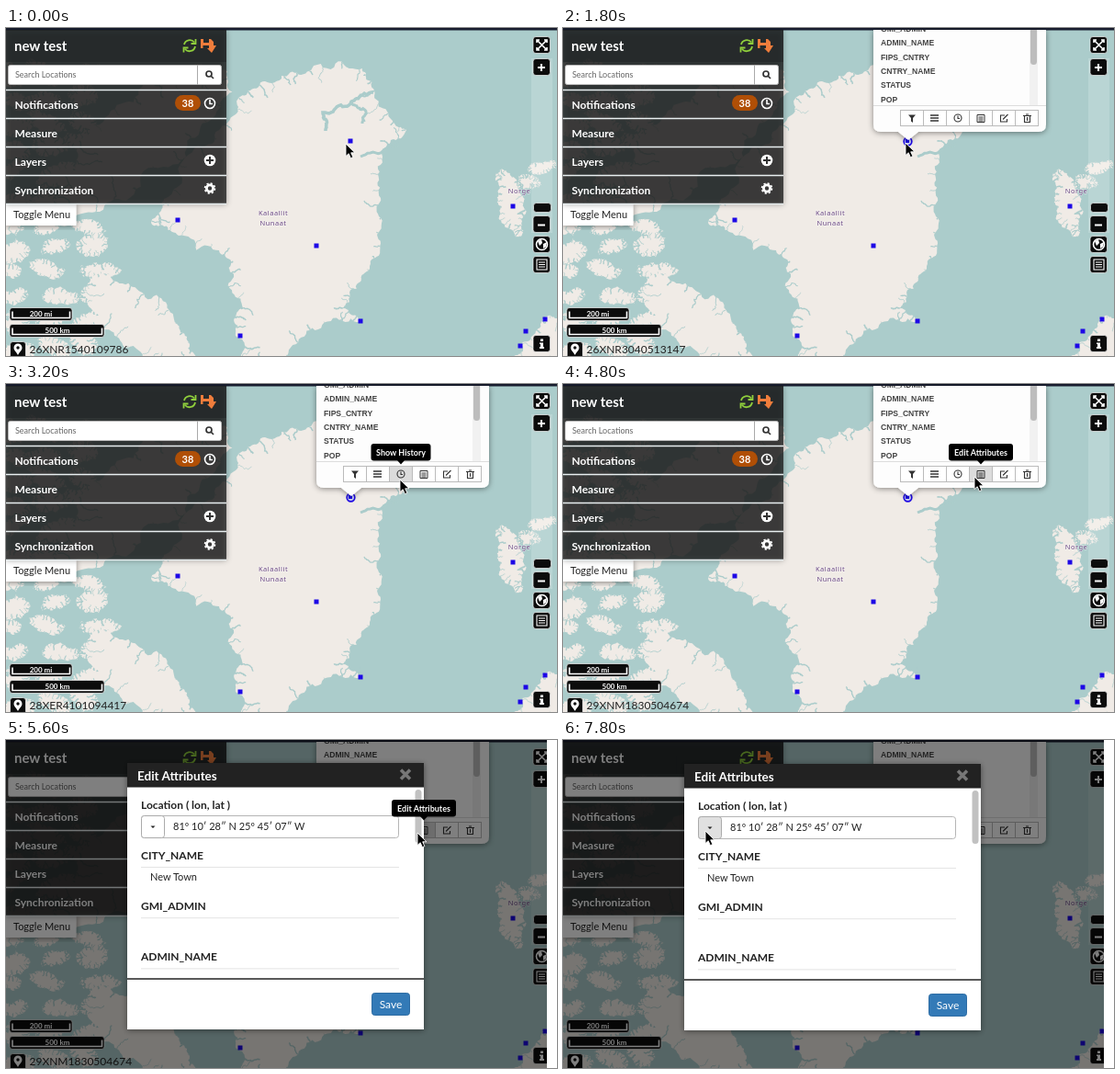
These frames come from a looping animation (600 px wide and 357 px high, 8 s). An HTML page:

```html
<!DOCTYPE html>
<html lang="en">
<head>
<meta charset="utf-8">
<title>Map editor</title>
<style>
html, body { margin: 0; height: 100%; overflow: hidden; }
svg { display: block; }
text { font: 12px Lato, sans-serif; fill: #222; }
.b { font-weight: bold; }
.w, text.w { fill: #fff; }
.mid { text-anchor: middle; }
.s8 { font-size: 8px; }
.s9 { font-size: 9px; }
.s11 { font-size: 11px; }
.s15 { font-size: 15px; }
.ctl { fill: #0c0c0c; stroke: #fff; stroke-opacity: .65; }
.line { fill: none; stroke: #fff; stroke-width: 1.6; }
.dark { fill: none; stroke: #333; stroke-width: 1.1; }
.field { font: bold 8.6px "Liberation Sans", sans-serif; fill: #444; }
.place { font: 7.5px "Noto Sans", sans-serif; fill: #64407c; text-anchor: middle; letter-spacing: .5px; stroke: #fff; stroke-opacity: .7; paint-order: stroke; }
</style>
</head>
<body>
<svg width="600" height="357" viewBox="0 0 600 357">
  <defs>
    <filter id="shadow" x="-20%" y="-20%" width="140%" height="140%">
      <feDropShadow dx="0" dy="1" stdDeviation="3" flood-opacity=".45"/>
    </filter>
    <clipPath id="list"><path d="M338 2H526V84H338Z"/></clipPath>
  </defs>
  <path fill="#abcccb" d="M0 0H600V357H0Z"/>
  <g id="map"></g>
  <text class="place" x="291" y="204">Kalaallit</text>
  <text class="place" x="291" y="215">Nunaat</text>
  <text class="place" x="559" y="180">Norge</text>
  <path fill="#171c2e" d="M0 0H600V2.500H0Z"/>

  <!-- Side menu -->
  <path filter="url(#shadow)" fill="#fff" d="M0 191H76.500V215H0Z"/>
  <text class="s11" x="8" y="207">Toggle Menu</text>
  <path filter="url(#shadow)" fill="#1b1b1c" fill-opacity=".76" d="M0 2H240V191H0Z"/>
  <path fill="#14171b" fill-opacity=".35" d="M0 2H240V37H0Z"/>
  <g id="menu"></g>
  <text class="b w s15" x="9" y="25">new test</text>
  <path fill="none" stroke="#8fce3c" stroke-width="1.800" d="M194 18A6.300 6.300 0 0 1 205 15.500M206 20A6.300 6.300 0 0 1 195 23M206.500 12V17H201.500M193.500 26.500V21.500H198.500"/>
  <path fill="#ef7d3c" fill-rule="evenodd" d="M212 12H223L226 15V19H229L224 27L219 22H212ZM215 12V16H221V12ZM214.500 19V22H221V19Z"/>
  <rect x="2.500" y="40.500" width="232" height="21" rx="2" fill="#fff" stroke="#bbb"/>
  <path stroke="#aaa" d="M208.500 40V62"/>
  <text class="s9" x="10" y="54" style="fill:#666">Search Locations</text>
  <path class="dark" style="stroke-width:1.700" d="M223 52L226 55M218 50a3 3 0 0 0 6 0a3 3 0 0 0-6 0"/>
  <rect x="184" y="73" width="28" height="17" rx="8.500" fill="#b04f06"/>
  <text class="b w mid s11" x="198" y="85.500">38</text>
  <path class="line" d="M216.500 82a5.500 5.500 0 0 0 11 0a5.500 5.500 0 0 0-11 0M222 78V82.500H225"/>
  <circle class="w" cx="222" cy="144" r="6.300"/><path stroke="#333" stroke-width="2" d="M218 144H226M222 140V148"/>
  <circle class="line" style="stroke-width:2.800" cx="222" cy="174.500" r="3.600"/>
  <circle class="line" cx="222" cy="174.500" r="5.500" stroke-dasharray="2.160"/>

  <!-- Map controls -->
  <path fill="#fff" fill-opacity=".17" d="M572 33H595V223H572Z"/>
  <g id="controls"></g>
  <text class="b w mid s8" x="38" y="314">200 mi</text>
  <text class="b w mid s8" x="56" y="332">500 km</text>
  <path class="w" fill-rule="evenodd" d="M13 356C11 352 8.500 351 8.500 348A4.500 4.500 0 0 1 17.500 348C17.500 351 15 352 13 356ZM11.300 348a1.700 1.700 0 0 0 3.400 0a1.700 1.700 0 0 0-3.400 0Z"/>
  <text id="position" x="25.500" y="353.500"></text>
  <path class="line" d="M578 16V13H581M586 13H589V16M589 21V24H586M581 24H578V21M578 13L589 24M589 13L578 24"/>
  <path class="line" style="stroke-width:2" d="M579 43H587M583 39V47M579 214.500H587"/>
  <circle class="line" cx="583.500" cy="235.500" r="6"/><path class="w" d="M579 232L583 230L584 234L581 237ZM585 235L589 233L588 238L585 240Z"/>
  <path class="line" style="stroke-width:1.100" d="M578 252H589V263H578ZM580 255H587M580 257.500H587M580 260H587"/>
  <path class="w" d="M582 338.500H585V341H582ZM581 342.500H585V347H586V349H581V347H582V344H581Z"/>

  <!-- Feature popup -->
  <g id="popup">
    <circle cx="375.500" cy="123.500" r="4.300" fill="#cdd4f5" stroke="#1d08e6" stroke-width="1.700"/><path fill="#1d08e6" d="M373 121H377V125H373Z"/>
    <path filter="url(#shadow)" fill="#fdfdfd" d="M338 2H526V105Q526 113 518 113H387L376 122L365 113H346Q338 113 338 105Z"/>
    <g clip-path="url(#list)">
      <g id="fields"></g>
      <path fill="#f1f1f1" d="M508 2H517V84H508Z"/><rect x="509" y="-4" width="7" height="44" rx="3.500" fill="#bdbdbd"/>
    </g>
    <path stroke="#ddd" d="M338 84.500H526"/>
    <g id="buttons"></g>
    <path fill="#333" d="M376 94.500H384L381 98V103L379 101.500V98Z"/>
    <path class="dark" style="stroke-width:1.600" d="M400 95H409M400 98H409M400 101H409"/>
    <path class="dark" d="M426 98a4 4 0 0 0 8 0a4 4 0 0 0-8 0M430 95.500V98.500H432"/>
    <path class="dark" style="stroke-width:1" d="M451 94.500H459V102.500H451ZM452.500 97H457.500M452.500 99H457.500M452.500 101H457.500"/>
    <path class="dark" d="M481 95H476.500V102H483.500V99M479 99.500L484.500 94"/>
    <path class="dark" d="M501 95.500H510M504 94H507M502.500 96V102.500H508.500V96M505.500 97V101"/>
  </g>

  <path id="backdrop" d="M0 0H600V357H0Z"/>
  <g id="modal">
    <path fill="#fff" d="M589 -5H600V420H589Z"/>
    <path filter="url(#shadow)" fill="#fff" d="M132 26H455V316H132Z"/>
    <path fill="#222" d="M132 26H455V52.500H132Z"/>
    <text class="b w" x="143" y="44.500" style="font-size:13.500px">Edit Attributes</text>
    <path stroke="#777" stroke-width="3.600" d="M430 33.500L440 43.500M440 33.500L430 43.500"/>
    <rect x="445.500" y="55" width="7" height="58" rx="3.500" fill="#c1c1c1"/>
    <text class="b" x="147" y="76">Location ( lon, lat )</text>
    <g id="attributes"></g>
    <rect x="147.500" y="83.500" width="280" height="24" rx="3" fill="#fff" stroke="#b5b5b5"/>
    <rect id="dropdown" x="147.500" y="83.500" width="25" height="24" rx="3" stroke="#aaa"/>
    <path fill="#222" d="M157.500 94.500H162.500L160 97Z"/>
    <text class="s11" x="182" y="99">81º 10′ 28″ N 25º 45′ 07″ W</text>
    <text class="s11" x="157" y="154">New Town</text>
    <path stroke="#222" stroke-width="1.400" d="M132 261H455"/>
    <rect x="398.500" y="276.500" width="41" height="24" rx="3" fill="#337ab7" stroke="#2e6da4"/>
    <text class="w mid" x="419" y="292.500">Save</text>
  </g>
  <g id="tooltip">
    <rect y="65" height="18.500" rx="3"/><path d="M-4 83H4L0 87.500Z"/>
    <text class="b w mid s9" y="77.500"></text>
  </g>
  <path id="arrow" stroke="#fff" stroke-width=".9" d="M0 0V13.500L3.200 10.700L5.400 15.700L7.900 14.600L5.700 9.800H10Z"/>
  <path id="beam" class="dark" d="M-3 -7Q0 -7 0 -5Q0 -7 3 -7M0 -5V5M-3 7Q0 7 0 5Q0 7 3 7"/>
</svg>
<script>
const $ = id => document.getElementById(id);
const set = (el, attrs) => { for (const k in attrs) el.setAttribute(k, attrs[k]); };
const add = (parent, tag, attrs, text = '') => {
  const el = document.createElementNS('http://www.w3.org/2000/svg', tag);
  set(el, attrs);
  el.textContent = text;
  return $(parent).appendChild(el);
};

let seed = 41;
const random = () => (seed = seed * 16807 % 2147483647) / 2147483647;
const jitter = size => (random() - .5) * size;

// Roughens a line by pushing midpoints sideways.
function rough(p, closed) {
  for (let pass = 0; pass < 4; pass++) {
    p = p.flatMap((a, i) => {
      const b = p[i + 1] || (closed && p[0]);
      if (!b) return [a];
      const k = jitter(.5);
      return [a, [(a[0] + b[0]) / 2 - (b[1] - a[1]) * k, (a[1] + b[1]) / 2 + (b[0] - a[0]) * k]];
    });
  }
  return p;
}
const path = p => 'M' + p.map(q => q.map(v => v.toFixed(1))).join('L');
const parse = text => text.split(' ').map(s => s.split(',').map(Number));
const water = (p, width) => add('map', 'path',
  { d: path(rough(p)), fill: 'none', stroke: '#abcccb', 'stroke-width': width });

// A clockwise coast, with short inlets cut along its inner normal.
function land(points, inlet) {
  const p = rough(points, true);
  add('map', 'path', { d: path(p) + 'Z', fill: '#f0ebe6' });
  for (let i = 3; i < p.length - 3; i += 6) {
    const [x, y] = p[i], dx = p[i - 3][1] - p[i + 3][1], dy = p[i + 3][0] - p[i - 3][0];
    const k = inlet * random() / (Math.hypot(dx, dy) || 1);
    water([[x, y], [x + dx * k, y + dy * k]], .6 + random());
  }
}
function island(cx, cy, rx, ry, degrees) {
  const tilt = degrees * Math.PI / 180, points = [];
  for (let i = 0; i < 10; i++) {
    const a = i * Math.PI / 5, r = 1 + jitter(.3), u = rx * r * Math.cos(a), v = ry * r * Math.sin(a);
    points.push([cx + u * Math.cos(tilt) - v * Math.sin(tilt), cy + u * Math.sin(tilt) + v * Math.cos(tilt)]);
  }
  land(points, ry * .7);
}

// Arctic archipelago, then the larger islands
for (let y = 50; y < 360; y += 27)
  for (let x = 8; x < 120; x += 42)
    island(x + jitter(20), y + jitter(10), 15 + random() * 10, 7 + random() * 6, jitter(60));
island(135, 130, 118, 42, -38);
island(150, 325, 72, 28, 42);
island(548, 190, 34, 14, 75);
island(570, 168, 13, 9, 0);
island(584, 152, 17, 7, -15);
island(585, 352, 48, 26, -35);

// Greenland and its northern fjords
land(parse('250,94 266,68 300,52 335,41 388,44 400,66 420,100 436,111 410,140 408,185 404,225 396,262 374,288 366,306 388,318 ' +
  '340,328 308,360 256,360 250,332 258,305 248,268 232,242 188,226 158,212 172,186 215,130'), 17);
water(parse('348,112 345,92 376,80 400,70'), 3.5);
water(parse('376,80 392,92 388,104'), 3);
water(parse('428,125 386,140'), 3);

for (const [x, y] of parse('375,123 187,209 338,237 386,319 255,335 552,194 566,330 587,317 560,346'))
  add('map', 'rect', { x: x - 2.5, y: y - 2.5, width: 5, height: 5, fill: '#1d08e6' });

// Repeated interface parts
['', '', 'Notifications', 'Measure', 'Layers', 'Synchronization'].forEach((name, i) => {
  const y = 5.5 + 31 * i;
  if (i) add('menu', 'path', { d: `M0 ${y + 31}H240`, stroke: '#e8eef0', 'stroke-width': 1.3 });
  add('menu', 'text', { class: 'b w', x: 9.5, y: y + 20.5 }, name);
});
const control = (x, y, width, height) => add('controls', 'rect', { class: 'ctl', x, y, width, height, rx: 3 });
for (const y of [9.5, 33.5, 204.5, 226.5, 248.5, 334.5]) control(574, y, 18.5, 18);
control(574.5, 190.5, 19, 10);
control(4.5, 341.5, 17, 18);
[[304.5, 68], [322.5, 103]].forEach(([y, width]) => {
  control(4, y, width, 14);
  add('controls', 'path', { class: 'line', d: `M7 ${y + 4}v7H${width + 1.5}v-7` });
});
['GMI_ADMIN', 'ADMIN_NAME', 'FIPS_CNTRY', 'CNTRY_NAME', 'STATUS', 'POP'].forEach((name, i) =>
  add('fields', 'text', { class: 'field', x: 346, y: 4 + i * 15.3 }, name));
const buttons = [0, 1, 2, 3, 4, 5].map(i =>
  add('buttons', 'rect', { x: 367.5 + 25 * i, y: 89.5, width: 25, height: 17, stroke: '#bbb' }));
['CITY_NAME', 'GMI_ADMIN', 'ADMIN_NAME'].forEach((name, i) => {
  const y = 131 + i * 55.2;
  add('attributes', 'text', { class: 'b', x: 147, y }, name);
  add('attributes', 'path', { d: `M147 ${y + 8.5}H428`, stroke: '#e4e4e4' });
});

// Pointer moves: start, end, target x and y, position text on arrival
const moves = [
  [0, 0, 370, 126, '26XNR1540109786'],
  [1400, 1600, 373, 125, '26XNR3040513147'],
  [2400, 3200, 429, 104, '28XER4101094417'],
  [3400, 4000, 487, 112, '30XVR2790418536'],
  [4000, 4800, 448, 101, '29XNM1830504674'],
  [6400, 7800, 155, 99, '']
];

function pointer(t) {
  let x = 0, y = 0, label = '';
  for (const [start, end, toX, toY, text] of moves) {
    if (t < start || (t === start && start > 0)) break;
    const k = t >= end ? 1 : 1 - (1 - (t - start) / (end - start)) ** 3;
    x += (toX - x) * k;
    y += (toY - y) * k;
    const digits = String(Math.floor(Math.abs(Math.sin(t)) * 9e8 + 1e8));
    label = k === 1 || !text ? text : text.slice(0, 6) + digits;
  }
  return { x: Math.round(x), y: Math.round(y), label };
}

function draw(now) {
  const t = Math.floor(now % 8000 / 200) * 200;
  const { x, y, label } = pointer(t);
  $('position').textContent = label;
  set($('popup'), { opacity: t < 1600 ? 0 : t < 1800 ? .5 : 1 });

  const history = t >= 3000 && t < 3600, edit = t >= 4200 && t < 6600;
  buttons.forEach((button, i) => set(button, { fill: (i === 2 && history) || (i === 3 && edit) ? '#dcdcdc' : '#fff' }));
  const [box, , text] = $('tooltip').children, width = edit ? 70 : 65;
  set($('tooltip'), { opacity: history || edit ? 1 : 0, transform: `translate(${edit ? 455 : 430})` });
  set(box, { x: -width / 2, width });
  text.textContent = edit ? 'Edit Attributes' : 'Show History';

  const fading = t < 5600;
  set($('backdrop'), { opacity: t < 5200 ? 0 : fading ? .42 : .5 });
  set($('modal'), {
    opacity: t < 5200 ? 0 : fading ? .35 : 1,
    transform: `translate(0 ${fading ? -62 : t < 5800 ? -1 : 0})`
  });
  set($('dropdown'), { fill: t >= 7600 ? '#e0e0e0' : '#fff' });

  const overText = t >= 6600 && x > 172 && x < 427;
  set($('arrow'), { transform: `translate(${x} ${y})`, opacity: overText ? 0 : 1 });
  set($('beam'), { transform: `translate(${x} ${y})`, opacity: overText ? 1 : 0 });
  requestAnimationFrame(draw);
}
requestAnimationFrame(draw);
</script>
</body>
</html>
```
